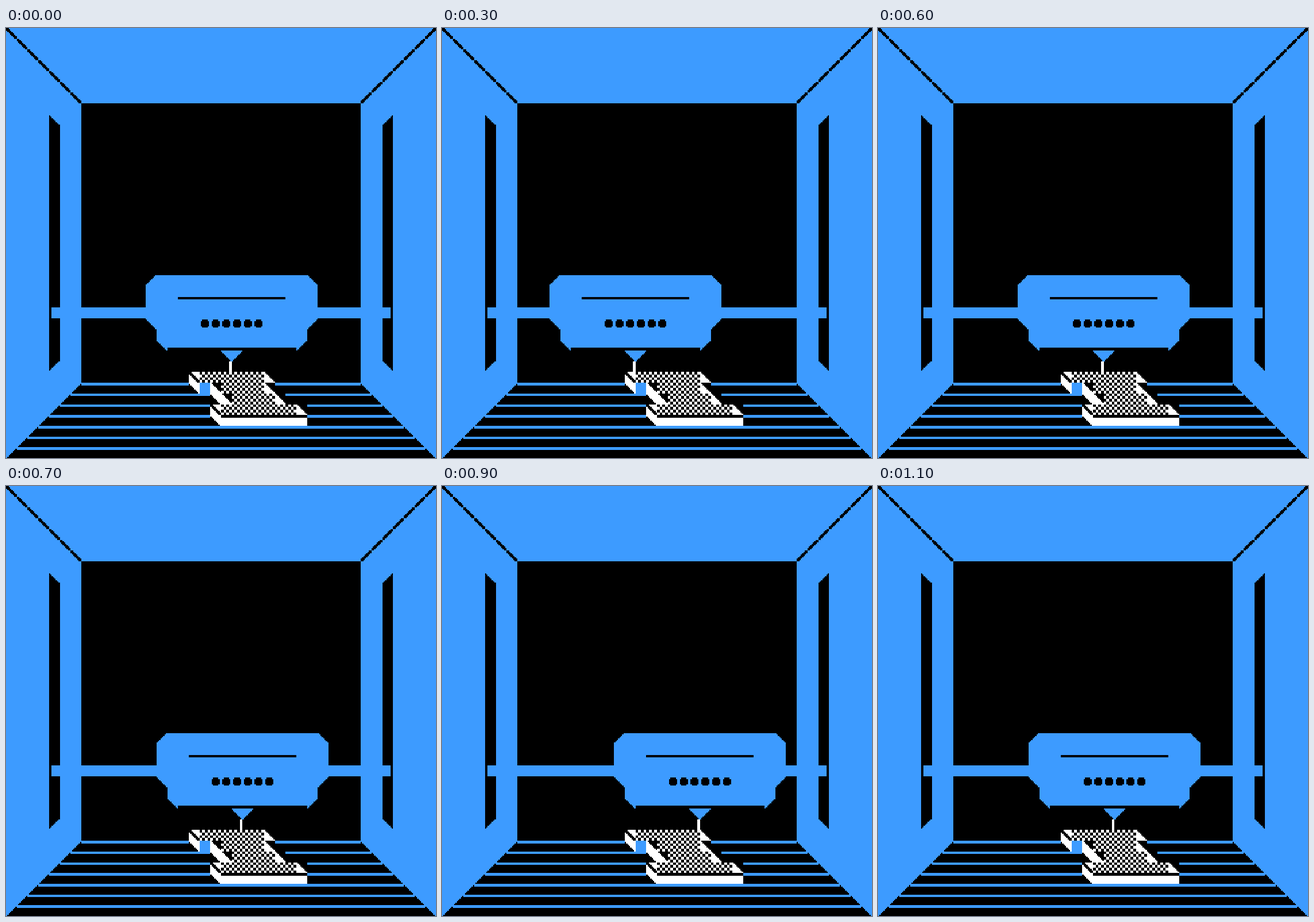
An HTML page with a canvas that plays this animation: 748x748 px, repeating every 1200 ms.

```html
<!DOCTYPE html>
<html>
<head>
<meta charset="utf-8">
<style>
html, body { margin: 0; height: 100%; overflow: hidden; background: #000; }
canvas { display: block; width: 100vw; height: 100vh; image-rendering: pixelated; }
</style>
</head>
<body>
<canvas id="stage" width="320" height="320"></canvas>
<script>
const g = document.getElementById('stage').getContext('2d');
const BLUE = '#3d9bff', BLACK = '#000', WHITE = '#fff';

function rect(x, y, w, h, color) {
  g.fillStyle = color;
  g.fillRect(x, y, w, h);
}

// All tile coordinates are in cells of 8 x 8 pixels.
const block = (col, row, w, h, color) => rect(col * 8, row * 8, w * 8, h * 8, color);

function tile(col, row, color, test) {
  for (let y = 0; y < 8; y++)
    for (let x = 0; x < 8; x++)
      if (test(x, y)) rect(col * 8 + x, row * 8 + y, 1, 1, color);
}

const upRight = (x, y) => x >= y;
const upLeft = (x, y) => x + y <= 7;
const downRight = (x, y) => x + y >= 7;
const downLeft = (x, y) => x <= y;
const fallLine = (x, y) => Math.abs(x - y) < 2;
const riseLine = (x, y) => Math.abs(x + y - 7) < 2;
const checker = (x, y) => (x >> 1) + (y >> 1) & 1;

function room() {
  block(0, 0, 40, 40, BLUE);
  block(7, 7, 26, 26, BLACK);
  for (let i = 0; i < 7; i++) {
    tile(i, i, BLACK, fallLine);
    tile(39 - i, i, BLACK, riseLine);
    const row = 33 + i, left = 6 - i, right = 33 + i;
    block(left, row, right - left + 1, 1, BLACK);
    rect(left * 8 + 8, row * 8, (right - left - 1) * 8, 2, BLUE);
    tile(left, row, BLUE, upLeft);
    tile(right, row, BLUE, upRight);
  }
  block(4, 8, 1, 24, BLACK);
  block(35, 8, 1, 24, BLACK);
  tile(4, 8, BLUE, upRight);
  tile(35, 8, BLUE, upLeft);
  tile(4, 31, BLUE, downRight);
  tile(35, 31, BLUE, downLeft);
  rect(34, 208, 252, 8, BLUE);
}

function slab() {
  // Clear the floor lines behind the slab.
  block(17, 33, 8, 1, BLACK);
  block(19, 34, 7, 1, BLACK);
  block(19, 35, 9, 2, BLACK);
  block(18, 33, 1, 1, BLUE);

  for (const [col, row, count] of [[18, 32, 6], [20, 33, 4], [21, 34, 4], [20, 35, 7]])
    for (let i = 0; i < count; i++) tile(col + i, row, WHITE, checker);
  for (const [col, row] of [[24, 32], [19, 33], [24, 33], [20, 34], [25, 34], [27, 35]])
    tile(col, row, WHITE, downLeft);
  for (const [col, row] of [[17, 32], [19, 35]]) {
    block(col, row, 1, 1, WHITE);
    tile(col, row, BLACK, fallLine);
  }
  for (const [col, row] of [[17, 33], [19, 34], [19, 36]])
    tile(col, row, WHITE, upRight);
  rect(160, 290, 64, 6, WHITE);
}

function head(col) {
  block(col + 1, 23, 14, 1, BLUE);
  block(col, 24, 16, 3, BLUE);
  block(col + 1, 27, 14, 2, BLUE);
  rect(col * 8 + 16, 232, 96, 6, BLUE);
  tile(col, 23, BLUE, downRight);
  tile(col + 15, 23, BLUE, downLeft);
  for (const [inset, row] of [[0, 27], [1, 29], [7, 30]]) {
    tile(col + inset, row, BLUE, upRight);
    tile(col + 15 - inset, row, BLUE, upLeft);
  }
  rect(col * 8 + 24, 200, 80, 2, BLACK);
  for (let i = 0; i < 6; i++) {
    const x = (col + 5 + i) * 8;
    rect(x + 2, 217, 4, 6, BLACK);
    rect(x + 1, 218, 6, 4, BLACK);
  }
  rect(col * 8 + 62, 248, 2, 8, WHITE);
}

function draw() {
  const step = Math.floor(performance.now() / 100) % 12;
  const shift = 3 - Math.abs((step + 9) % 12 - 6);
  room();
  slab();
  head(13 + shift);
  requestAnimationFrame(draw);
}
draw();
</script>
</body>
</html>
```
